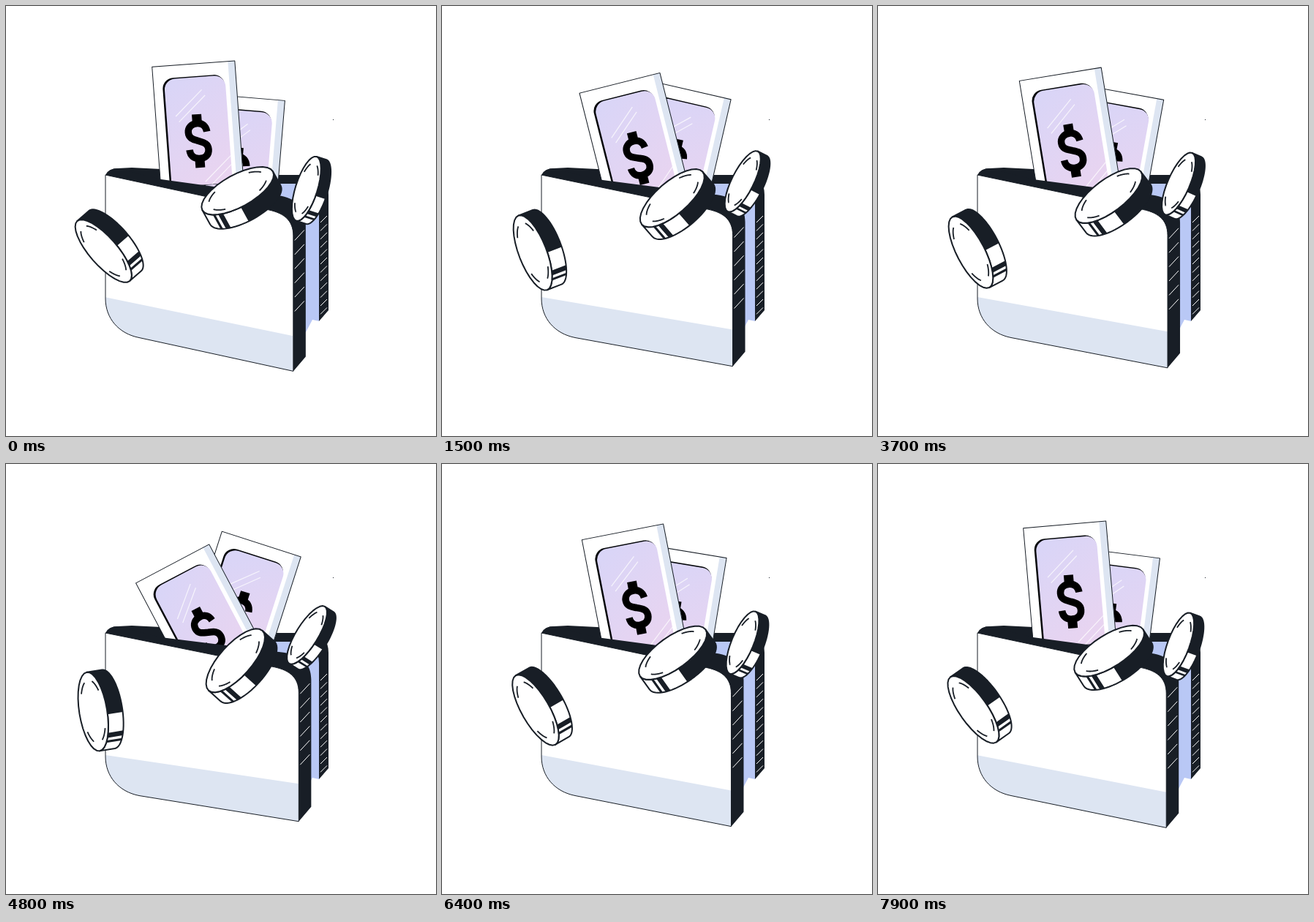
Animation, 588 px wide and 588 px high, one loop 8 s. Source, as an HTML page with a canvas:

```html
<!DOCTYPE html>
<html lang="en">
<head>
<meta charset="utf-8">
<title>Wallet</title>
<style>
  html, body { margin: 0; width: 100%; height: 100%; overflow: hidden; background: #fff; }
  canvas { display: block; width: 588px; height: 588px; }
</style>
</head>
<body>
<canvas id="stage" width="588" height="588"></canvas>
<script>
const ctx = document.getElementById('stage').getContext('2d');
const INK = '#181e26', SKY = '#b9c8f5', MIST = '#dde5f2', WHITE = '#fff';
const LOOP = 8000, STEP = 100;

// Moments when the wallet is widest open; it swings shut and back between them
const OPEN_AT = [-200, 2060, 4100, 6010, 8200];
const BILL_LEAD = 40;

const rad = deg => deg * Math.PI / 180;

function swing(t) {
  const next = OPEN_AT.findIndex(at => at > t);
  const from = OPEN_AT[next - 1];
  const s = (t - from) / (OPEN_AT[next] - from);
  return .88 * Math.sin(Math.PI * s) ** 1.35;
}

function paint(path, fill, stroke, width = 1) {
  if (fill) { ctx.fillStyle = fill; ctx.fill(path); }
  if (stroke) { ctx.strokeStyle = stroke; ctx.lineWidth = width; ctx.stroke(path); }
}

function trace(points, closed = true) {
  const p = new Path2D();
  points.forEach(([x, y]) => p.lineTo(x, y));
  if (closed) p.closePath();
  return p;
}

function line(x0, y0, x1, y1, width = 1) {
  paint(trace([[x0, y0], [x1, y1]], false), null, WHITE, width);
}

const DOLLAR_S = new Path2D('M12.5-12C11.5-20 7-24 0-24C-8-24-13-19-13-12.5C-13-4-6-2.5 0 0' +
  'C8 3 13 5 13 12.5C13 20 8 24 0 24C-7.5 24-12.5 20-13 11.5');

// Bill hangs from its top right corner
function bill(x, y, deg) {
  const w = 113.4, len = 166;
  ctx.save();
  ctx.translate(x, y);
  ctx.rotate(rad(deg));
  const sheet = trace([[-w, 0], [0, 0], [0, len], [-w, len]]);
  paint(sheet, WHITE);
  ctx.fillStyle = MIST;
  ctx.fillRect(-9.5, 0, 9.5, len);
  paint(sheet, null, INK);

  const panel = (px, py, pw) => {
    const p = new Path2D();
    p.roundRect(px, py, pw, 190, 15);
    return p;
  };
  ctx.save();
  ctx.clip(sheet);
  paint(panel(-101, 17, 85), '#05070a');
  const tint = ctx.createLinearGradient(-98, 30, -15, 150);
  tint.addColorStop(0, '#d9d5f7');
  tint.addColorStop(1, '#e9d4f0');
  const face = panel(-98.5, 18.5, 83.5);
  paint(face, tint);
  ctx.clip(face);
  ctx.globalAlpha = .75;
  for (const [sx, sy] of [[-86, 70], [-82, 78], [-52, 162], [-44, 167]])
    line(sx, sy, sx + 38, sy - 34, 1.2);
  ctx.restore();

  ctx.translate(-57.5, 105.7);
  paint(DOLLAR_S, null, '#000', 9.5);
  ctx.fillStyle = '#000';
  ctx.fillRect(-6.5, -36.5, 13, 12);
  ctx.fillRect(-6.5, 24.5, 13, 12);
  ctx.restore();
}

function backCover() {
  paint(new Path2D('M138 231Q141 222 153 222L172 221L212 223L372 231L418 231Q441 234 441 258' +
    'L441 416L428 431L400 300L150 245Z'), INK);
  paint(new Path2D('M215 243L398 243Q428 246 428 272L428 431L419 429L410 446L400 446L370 300Z'), SKY);
  for (let y = 296; y < 425; y += 11.4) line(430, y, 439, y - 9);
}

function frontCover(u) {
  const R = 391 + 12 * u, B = 502 - 17 * u;
  const T = 231 + (R - 174) * (.218 - .02 * u);
  paint(new Path2D(`M136 231Q140 222 153 222L212 237L${R - 21} ${T - 19}` +
    `C${R + 4} ${T - 15} ${R + 17} ${T - 4} ${R + 17} ${T + 18}` +
    `L${R + 17} ${B - 20}L${R} ${B}L${R - 60} ${T + 60}Z`), INK);

  const face = new Path2D(`M136 231L${R - 38} ${T}C${R - 14} ${T + 4} ${R} ${T + 14} ${R} ${T + 36}` +
    `L${R} ${B}L182 453.5C154 448 136 427 136 400Z`);
  paint(face, WHITE);
  ctx.save();
  ctx.clip(face);
  paint(trace([[130, 397], [R, 454.8 - 22.5 * u], [R, 510], [130, 510]]), MIST);
  ctx.restore();
  paint(face, null, INK);

  for (let i = 0; i < 6; i++) {
    const y = 322 + 19.4 * i - 10 * u;
    line(R + 2, y, R + 15, y - 14);
  }
}

// Disc centred on (x, y): long axis at deg, rim of thickness h on the given side
function coin(x, y, deg, a, b, h, side) {
  const c = Math.cos(rad(deg)), s = Math.sin(rad(deg));
  const at = (t, shift, k = 1) => {
    const p = a * k * Math.cos(t), q = b * k * Math.sin(t) + side * h * shift;
    return [x + p * c - q * s, y + p * s + q * c];
  };
  const arc = (t0, t1, shift, k) =>
    Array.from({ length: 33 }, (_, i) => at(t0 + (t1 - t0) * i / 32, shift, k));
  const rim = (f0, f1) => {
    const start = side > 0 ? 0 : Math.PI;
    const t0 = start + Math.PI * f0, t1 = start + Math.PI * f1;
    return trace([...arc(t0, t1, -.5), ...arc(t1, t0, .5)]);
  };

  ctx.lineJoin = 'round';
  paint(rim(0, 1), WHITE, INK, 2);
  for (const [f0, f1] of [[0, .54], [.7, .75], [.78, .81]]) paint(rim(f0, f1), INK);
  paint(trace(arc(0, 2 * Math.PI, -.5)), WHITE, INK, 2);
  for (const t of [.65, 2.5, 3.75, 5.6])
    paint(trace(arc(t - .28, t + .28, -.5, .8), false), null, INK, 1.8);
}

function draw(t) {
  const u = swing(t);
  const tilt = 1 + 37 * swing(t + BILL_LEAD) ** 1.5;
  ctx.fillStyle = WHITE;
  ctx.fillRect(0, 0, 588, 588);
  ctx.fillStyle = INK;
  ctx.fillRect(447, 155, 1, 1);

  backCover();
  bill(376 + 35 * u, 130 - 4 * u, 1.5 + 21 * u);
  bill(319 - 1.48 * tilt, 73.5 + 60 * u * u, -tilt);
  frontCover(u);

  coin(417.5, 255.5 - 23 * u, -76 + 23 * u, 46, 15, 14, 1);
  coin(322, 259 + 22 * u, -24 - 31 * u, 55, 22, 22, 1);
  coin(144 - 18.5 * u, 326 + 14 * u, 41 + 51 * u, 54.5, 19, 21, -1);
}

const begun = performance.now();
function tick() {
  const t = (performance.now() - begun) % LOOP;
  draw(Math.floor(t / STEP) * STEP);
  requestAnimationFrame(tick);
}
tick();
</script>
</body>
</html>
```
